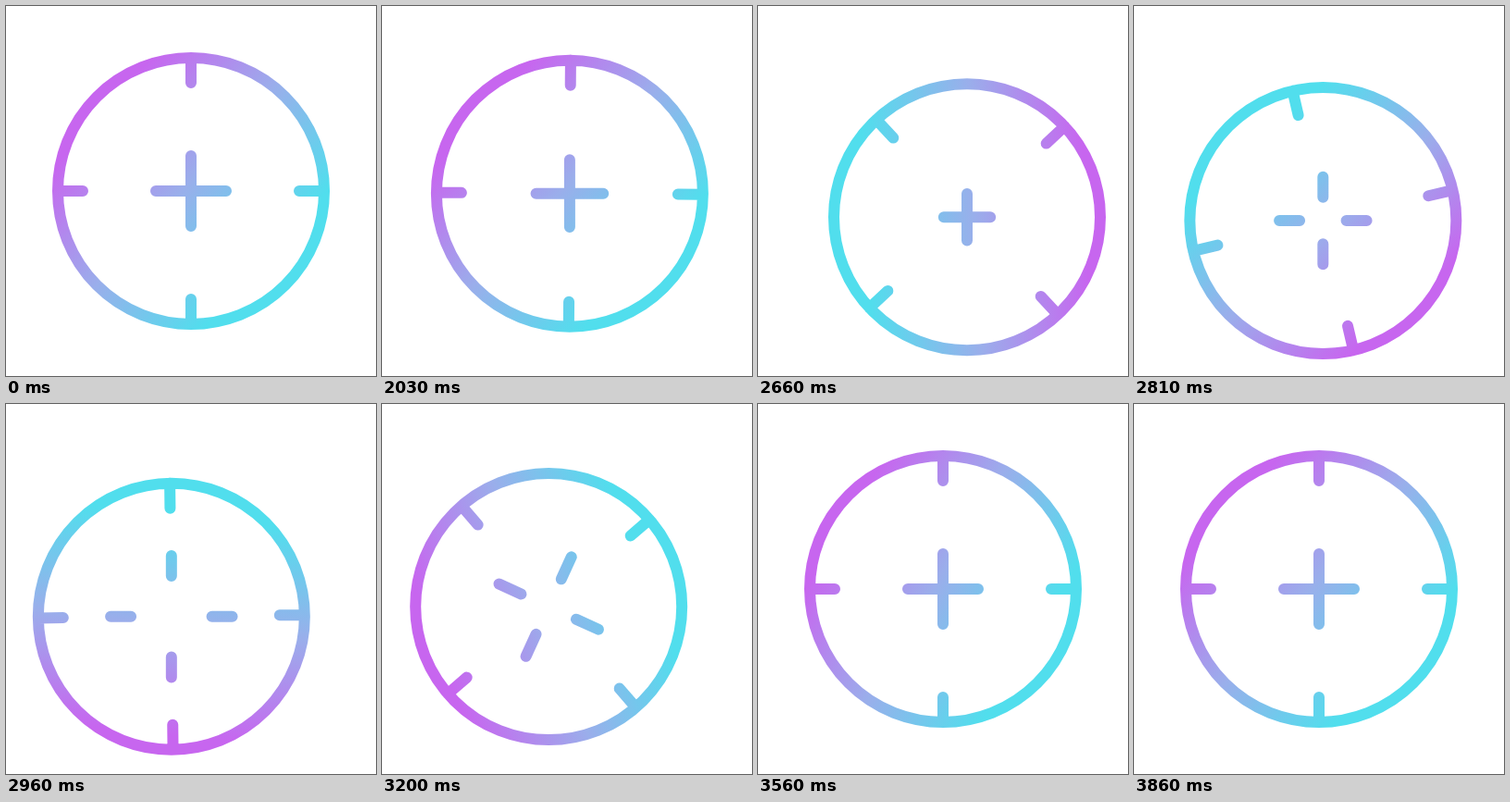
An HTML page with a canvas for the animation above (3.95 s loop, 400 by 400 pixels).

```html
<!DOCTYPE html>
<html lang="en">
<head>
<meta charset="utf-8">
<title>Crosshair</title>
<style>
  html, body { margin: 0; width: 100%; height: 100%; overflow: hidden; background: #fff; }
  canvas { display: block; width: 400px; height: 400px; }
</style>
</head>
<body>
<canvas id="stage" width="400" height="400"></canvas>
<script>
const ctx = document.getElementById('stage').getContext('2d');
const LOOP = 3950, START = 2000, END = 3860, STEP = 30;
const MID = 200, RADIUS = 144, TICK = 117;
const { PI, sin, cos, min, max, floor } = Math;

const clamp = (v, lo, hi) => min(max(v, lo), hi);
const span = (t, from, to) => clamp((t - from) / (to - from), 0, 1);
const mix = (a, b, u) => a + (b - a) * u;

// Symmetric slow-fast-slow curve.
function ease(u, p = 1.75) {
  const a = u ** p, b = (1 - u) ** p;
  return a / (a + b);
}

// Four radial strokes, a quarter turn apart.
function spokes(angle, from, to) {
  for (let i = 0; i < 4; i++) {
    const a = angle + i * PI / 2, s = sin(a), c = -cos(a);
    ctx.moveTo(from * s, from * c);
    ctx.lineTo(to * s, to * c);
  }
}

// Purple, periwinkle, cyan along an axis through the ring's centre.
function sweep(angle) {
  const s = sin(angle), c = -cos(angle);
  const paint = ctx.createLinearGradient(128 * s, 128 * c, -110 * s, -110 * c);
  ['#c766ef', '#9aaeeb', '#51deed'].forEach((color, i) => paint.addColorStop(i / 2, color));
  return paint;
}

function draw(t) {
  const leave = span(t, START, 2290);
  const swing = PI * span(t, 2605, 3055);
  const away = leave * (1 - ease(span(t, 3060, 3450)));
  const firstTurn = ease(span(t, START, 3000));
  const close = ease(span(t, 3000, 3550));

  // The ring goes to the lower right, swings along a shallow arc, then returns.
  const x = mix(MID, 200.5 + 27.5 * cos(swing), away);
  const y = mix(MID, 226 + 6 * sin(swing), away);

  const gap = 45 * ease(span(t, 2580, 3010)) * (1 - close);
  const arm = 38 - 16 * leave * (1 - close);
  const hue = 2 * PI * ease(1 - (1 - span(t, START, END)) ** 1.25, 1.6);

  ctx.setTransform(1, 0, 0, 1, 0, 0);
  ctx.fillStyle = '#fff';
  ctx.fillRect(0, 0, 400, 400);
  ctx.translate(x, y);

  ctx.strokeStyle = sweep(hue - 0.84);
  ctx.lineWidth = 12;
  ctx.lineCap = 'round';
  ctx.beginPath();
  ctx.arc(0, 0, RADIUS, 0, 2 * PI);
  spokes(PI * (firstTurn + close), RADIUS, TICK);
  spokes(PI / 2 * close, gap, gap + arm);
  ctx.stroke();
}

function frame() {
  const t = performance.now() % LOOP;
  draw(clamp(START + floor((t - START) / STEP) * STEP, START, END));
  requestAnimationFrame(frame);
}
frame();
</script>
</body>
</html>
```
